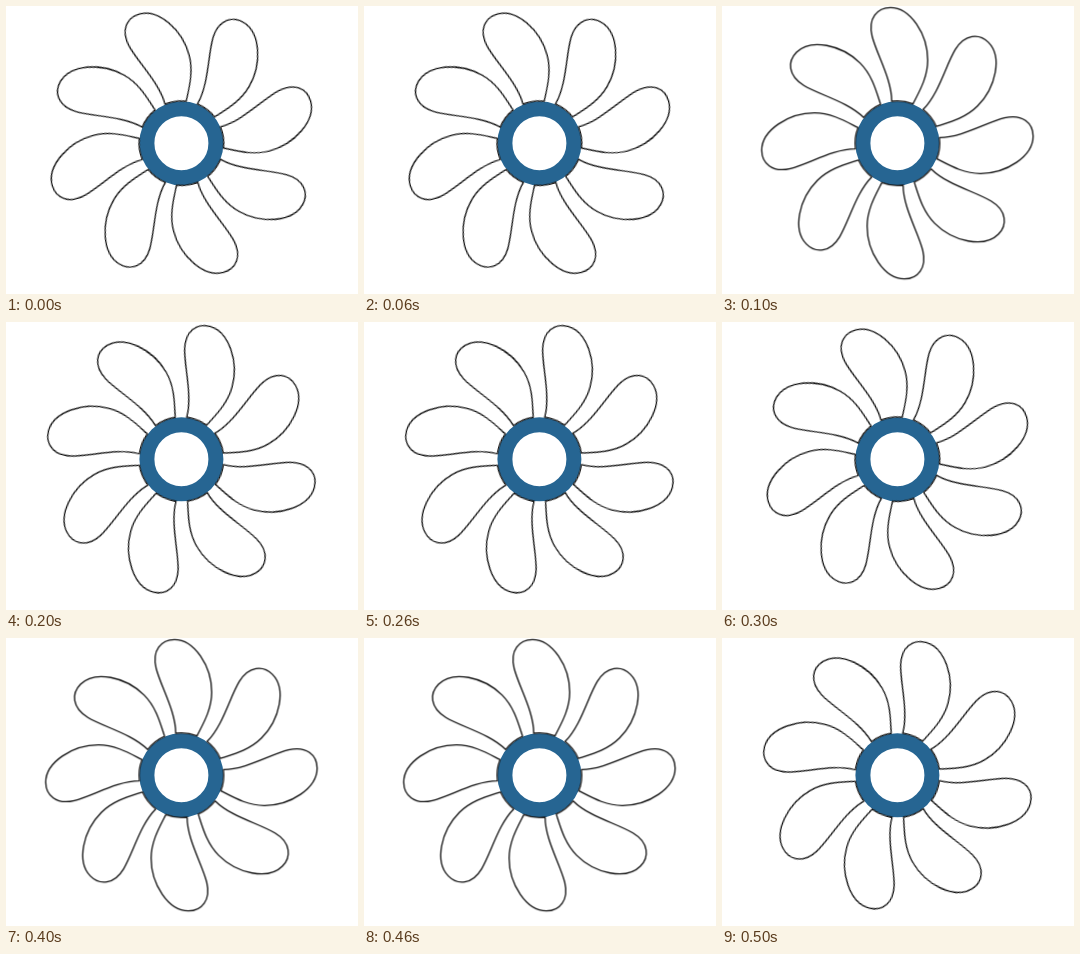
Animation, 352 px wide and 288 px high, one loop 0.6 s. Source, as an HTML page without scripts:

```html
<!DOCTYPE html>
<html lang="en">
<head>
<meta charset="utf-8">
<title>Turning flower</title>
<style>
  html, body { margin: 0; width: 100%; height: 100%; overflow: hidden; background: #fff; }
  svg { display: block; width: 100vw; height: 100vh; }
  .petals { fill: none; stroke: #111; stroke-width: 1.3; animation: turn 300ms steps(3) infinite; }
  .hub { fill: #fff; stroke: #266592; stroke-width: 15; }
  /* One petal pitch per cycle, so the loop is seamless */
  @keyframes turn {
    from { transform: rotate(-15deg); }
    to { transform: rotate(30deg); }
  }
</style>
</head>
<body>
<svg viewBox="0 0 352 288">
  <defs>
    <path id="petal" d="M-5.7-42C-5.6-64-20.8-89-25.3-107C-29.8-125-20-135.7-7-135.7C13-135.7 30.3-109 30.3-83C30.3-66 22-52 15.6-39.4A42.4 42.4 0 0 0-5.7-42Z"/>
    <g id="pair">
      <use href="#petal"/>
      <use href="#petal" transform="rotate(45)"/>
    </g>
  </defs>
  <g transform="translate(175.4 137.2)">
    <circle class="hub" r="34.5"/>
    <g class="petals">
      <use href="#pair"/>
      <use href="#pair" transform="rotate(90)"/>
      <use href="#pair" transform="rotate(180)"/>
      <use href="#pair" transform="rotate(270)"/>
    </g>
  </g>
</svg>
</body>
</html>
```
